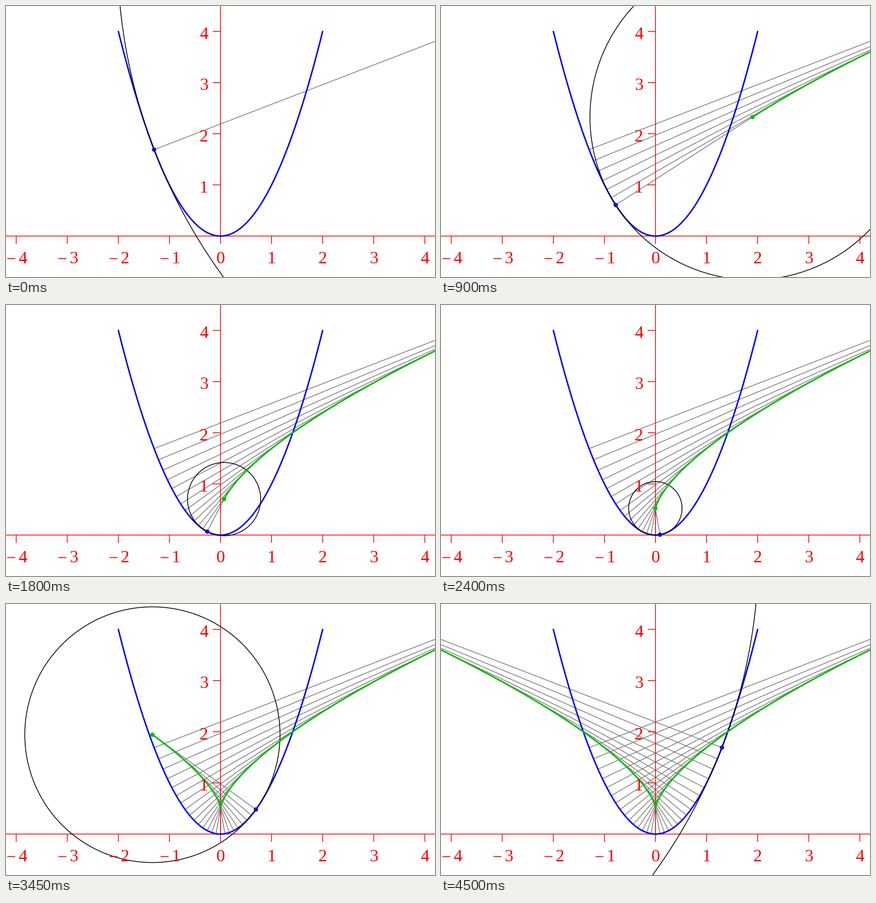
Write a matplotlib script that moves like this. It is 942 px wide and 594 px high and loops after 4650 ms.

```python
import numpy as np
import matplotlib.pyplot as plt
from matplotlib.animation import FuncAnimation
from matplotlib.collections import LineCollection
from matplotlib.patches import Circle

W, H, DPI = 942, 594, 64
STEPS, T_MAX = 31, 1.3
X0, Y0, UNIT = 471.0, 504.3, 112.15
PT = 72 / DPI  # points per pixel
RED, BLUE, GREEN, GRAY = "#ff0000", "#0000ff", "#0cbb0c", "#808080"


def to_px(x, y):
    return X0 + UNIT * np.asarray(x), Y0 - UNIT * np.asarray(y)


def parabola(t):
    return to_px(t, t**2)


def evolute(t):
    return to_px(-4 * t**3, 3 * t**2 + 0.5)


def radius(t):
    return UNIT * (1 + 4 * t**2) ** 1.5 / 2


fig = plt.figure(figsize=(W / DPI, H / DPI), dpi=DPI, facecolor="white")
ax = fig.add_axes([0, 0, 1, 1])
ax.set_xlim(0, W)
ax.set_ylim(H, 0)
ax.axis("off")


def line(x, y, color, width, z, cap="round"):
    return ax.plot(x, y, color=color, lw=width * PT, zorder=z, snap=False,
                   solid_capstyle=cap, solid_joinstyle="round")[0]


def digit(x, baseline, n):
    ax.text(x, baseline, str(n), color=RED, fontsize=38 * PT, zorder=9,
            family="Liberation Serif", ha="center", va="baseline")


def draw_axes():
    line([-5, W + 5], [Y0, Y0], RED, 1.7, 2)
    line([X0, X0], [-5, Y0 + 17], RED, 1.7, 2, "butt")
    for n in range(-4, 5):
        x = X0 + n * UNIT
        if n:
            line([x, x], [Y0, Y0 + 17], RED, 1.7, 2, "butt")
        if n < 0:
            line([x - 19.5, x - 2], [553.6, 553.6], RED, 2, 9, "butt")
        digit(x + (14.5 if n < 0 else 0), 564.3, abs(n))
    for n in range(1, 5):
        y = Y0 - n * UNIT
        line([X0 - 17, X0], [y, y], RED, 1.7, 2, "butt")
        digit(434.3, y + 16.6, n)


draw_axes()
line(*parabola(np.linspace(-2, 2, 201)), BLUE, 3.2, 3)

normals = LineCollection([], colors=GRAY, linewidths=1.7 * PT, zorder=1)
normals.set_snap(False)
ax.add_collection(normals, autolim=False)
trail = line([], [], GREEN, 3.4, 5)
osculating = Circle((0, 0), 1, fill=False, ec="black", lw=1.7 * PT, zorder=4)
foot = Circle((0, 0), 4.7, fc=BLUE, lw=0, zorder=6)
center = Circle((0, 0), 4.7, fc=GREEN, lw=0, zorder=6)
for patch in (osculating, foot, center):
    patch.set_snap(False)
    ax.add_patch(patch)

params = np.linspace(-T_MAX, T_MAX, STEPS)


def update(i):
    t = params[i]
    normals.set_segments([[parabola(s), evolute(s)] for s in params[:i + 1]])
    trail.set_data(*evolute(np.linspace(-T_MAX, t, 12 * i + 2)))
    foot.center = parabola(t)
    center.center = osculating.center = evolute(t)
    osculating.set_radius(radius(t))
    return normals, trail, osculating, foot, center


anim = FuncAnimation(fig, update, frames=STEPS, interval=150,
                     repeat=True, repeat_delay=0, blit=False)
plt.show()
```
